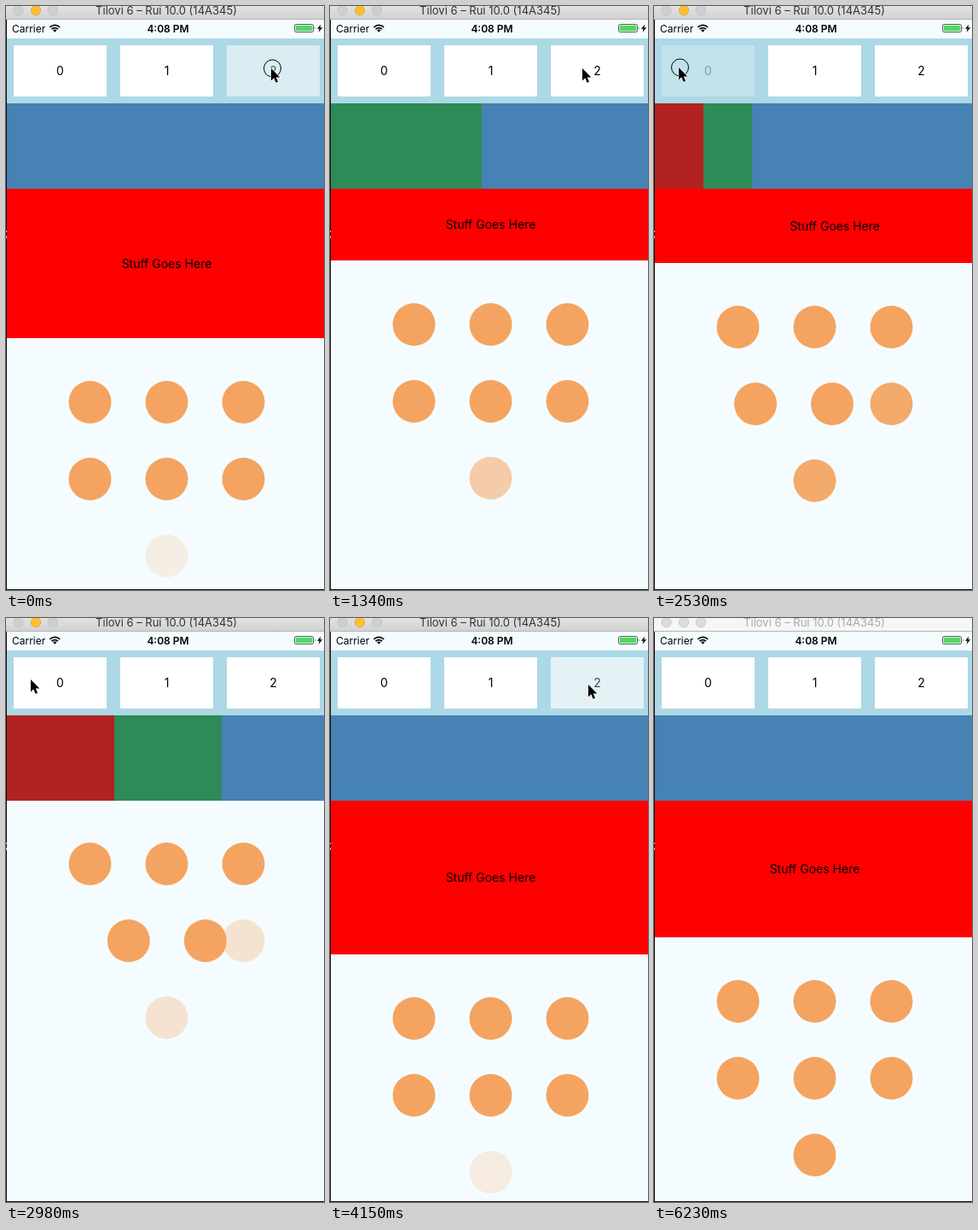
Recreate the animation shown at these times as an HTML page. Size 373x684 px, loop 6330 ms.

```html
<!DOCTYPE html>
<html lang="en">
<head>
<meta charset="utf-8">
<title>Layout spring</title>
<style>
html, body { margin: 0; width: 100%; height: 100%; overflow: hidden; background: #f5fcff; }
svg { display: block; }
text { font-family: Inter, Roboto, sans-serif; fill: #000; }
.mid { text-anchor: middle; }
</style>
</head>
<body>
<svg id="stage" width="373" height="684" viewBox="0 0 373 684">
  <defs>
    <linearGradient id="chrome" x2="0" y2="1">
      <stop offset="0" stop-color="#e2e2e2"/><stop offset="1" stop-color="#d2d2d2"/>
    </linearGradient>
  </defs>
  <rect width="373" height="684" fill="#f5fcff"/>

  <g id="titleBar">
    <rect id="bar" width="373" height="15" fill="url(#chrome)"/>
    <rect y="15" width="373" height="1" fill="#b4b4b4"/>
    <g id="lights" stroke-width=".7">
      <circle cx="14.5" cy="5" r="5.7"/><circle cx="35" cy="5" r="5.7"/><circle cx="55" cy="5" r="5.7"/>
    </g>
    <text id="title" class="mid" x="188" y="10" font-size="13">Tilovi 6 – Rui 10.0 (14A345)</text>
  </g>

  <text x="7" y="31" font-size="12">Carrier</text>
  <g fill="none" stroke="#000" stroke-width="1.7">
    <path d="M51.4 24.8Q57.3 19.8 63.2 24.8M53.5 27.2Q57.3 24 61.1 27.2"/>
    <path d="M55 28.3Q57.3 26.6 59.6 28.3L57.3 30.8Z" fill="#000" stroke="none"/>
  </g>
  <text class="mid" x="190" y="31" font-size="12" font-weight="600">4:08 PM</text>
  <rect x="338.5" y="21.5" width="22" height="9" rx="1.8" fill="#fff" stroke="#333" stroke-width=".8"/>
  <rect x="339.7" y="22.7" width="19.6" height="6.6" rx=".8" fill="#4cd964"/>
  <path d="M361.8 24.2q1.6 1.8 0 3.6z" fill="#333"/>
  <path d="M369.3 21.5L365 26.8H367.6L366.6 30.8L371.2 25.2H368.4Z"/>

  <rect y="38" width="373" height="76" fill="#add8e6"/>
  <g id="buttons"></g>
  <g id="stripes"></g>
  <svg id="box" y="214" width="373">
    <rect width="373" height="300" fill="#f00"/>
    <text id="label" class="mid" font-size="14">Stuff Goes Here</text>
  </svg>
  <g id="dots" fill="#f4a460"></g>

  <path d="M.5 16V684M0 683.5H373" stroke="#111"/>
  <path d="M.5 263V265M.5 269V272" stroke="#aaa"/>
  <circle id="ring" r="10" fill="none" stroke="#000"/>
  <path id="cursor" d="M0 0V14.4L3.3 11.3L5.6 16.7L8 15.7L5.7 10.4H10.3Z"
        stroke="#fff" stroke-width="1.1" paint-order="stroke"/>
</svg>
<script>
const LOOP = 6330, SPRING = 700, PERIOD = 295, DAMPING = 0.4;
const LEFT = 1, TOP = 214;

// Each tap: pressed at `down`, released at `up`, then that page springs in.
const taps = [
  { page: 2, down: -300, up: -118 },
  { page: 1, down: 740, up: 1020 },
  { page: 2, down: 1430, up: 1561 },
  { page: 0, down: 2330, up: 2480 },
  { page: 1, down: 3270, up: 3425 },
  { page: 2, down: 3830, up: 4013 }
];
const pages = [
  { edges: [0, 125, 250], height: 0, count: 5, shift: 45, textX: 52 },
  { edges: [0, 0, 187.5], height: 80, count: 6, shift: 0, textX: 0 },
  { edges: [0, 0, 0], height: 160, count: 7, shift: 0, textX: 0 }
];
// Pointer: time, x, y
const route = [
  [0, 311, 73], [200, 310, 74], [650, 168, 82], [1060, 168, 82],
  [1390, 302, 73], [1640, 302, 73], [1930, 287, 72], [2300, 29, 72],
  [2980, 29, 72], [3250, 166, 79], [3440, 168, 79], [3720, 302, 78],
  [4200, 303, 78], [4450, 307, 130], [4740, 313, 530], [4890, 316, 668]
];

// The screen refreshes in steps of about 150 ms.
const ticks = [];
const tens = v => Math.floor(v / 10) * 10;
for (let k = 0; k <= 25; k++) ticks.push(tens(k * 148.8 + 5));
for (let k = 1; k <= 7; k++) ticks.push(tens(3720 + k * 146));
ticks.push(4890, 5040, 6230);

const $ = id => document.getElementById(id);
const lerp = (a, b, p) => a + (b - a) * p;
const clamp = v => Math.max(0, Math.min(1, v));
const ease = v => v < 0.5 ? 2 * v * v : 1 - 2 * (1 - v) * (1 - v);
const set = (el, attrs) => {
  for (const key in attrs) el.setAttribute(key, attrs[key]);
  return el;
};
const add = (parent, tag, attrs) =>
  parent.appendChild(set(document.createElementNS('http://www.w3.org/2000/svg', tag), attrs));

const buttons = [0, 1, 2].map(i => {
  const g = add($('buttons'), 'g', {});
  add(g, 'rect', { x: 9 + i * 125, y: 46, width: 109, height: 60, fill: '#fff' });
  add(g, 'text', { x: 63.5 + i * 125, y: 81, 'font-size': 14, class: 'mid' }).textContent = i;
  return g;
});
const stripes = ['#b22222', '#2e8b57', '#4682b4'].map(fill =>
  add($('stripes'), 'rect', { y: 114, width: 800, height: 100, fill }));
const dots = Array.from({ length: 7 }, () => add($('dots'), 'circle', { r: 25 }));
const lights = [...$('lights').children];

function spring(t) {
  if (t >= SPRING) return 1;
  const angle = 2 * Math.PI * t / PERIOD;
  const ratio = DAMPING / Math.sqrt(1 - DAMPING * DAMPING);
  return 1 - Math.exp(-ratio * angle) * (Math.cos(angle) + ratio * Math.sin(angle));
}

function pointerAt(t) {
  const i = route.findIndex(stop => stop[0] > t);
  if (i < 0) return route[route.length - 1].slice(1);
  const a = route[i - 1], b = route[i];
  const p = ease((t - a[0]) / (b[0] - a[0]));
  return [lerp(a[1], b[1], p), lerp(a[2], b[2], p)];
}

function drawLayout(t) {
  const last = taps.filter(tap => tap.up <= t).length - 1;
  const from = pages[last ? taps[last - 1].page : 1];
  const to = pages[taps[last].page];
  const age = t - taps[last].up;
  const p = spring(age), fade = clamp(age / SPRING);
  const mix = key => lerp(from[key], to[key], p);

  stripes.forEach((el, i) =>
    set(el, { x: LEFT + Math.round(lerp(from.edges[i], to.edges[i], p)) }));

  const height = Math.round(mix('height'));
  set($('box'), { height: Math.max(0, height), visibility: height > 0 ? 'visible' : 'hidden' });
  set($('label'), { x: 188.5 + mix('textX'), y: height / 2 + 5 });

  dots.forEach((el, i) => {
    const row = Math.floor(i / 3), col = row === 2 ? 1 : i % 3;
    const moves = i === 3 || i === 4;
    set(el, {
      cx: 98.5 + col * 90 + (moves ? mix('shift') : 0),
      cy: TOP + height + 75 + row * 90,
      opacity: lerp(+(i < from.count), +(i < to.count), fade)
    });
  });
}

function drawTouch(t) {
  buttons.forEach((el, i) => {
    const tap = taps.filter(item => item.page === i && item.down <= t).pop();
    let opacity = 1;
    if (tap) {
      opacity = t < tap.up
        ? lerp(1, 0.2, ease(clamp((t - tap.down) / 150)))
        : lerp(0.2, 1, ease(clamp((t - tap.up) / 250)));
    }
    set(el, { opacity });
  });

  const [x, y] = pointerAt(t).map(Math.round);
  const touching = taps.some(tap => tap.down <= t && t <= tap.up + 130);
  set($('cursor'), { transform: `translate(${x} ${y})`, visibility: t < 5040 ? 'visible' : 'hidden' });
  set($('ring'), { cx: x + 1.5, cy: y, visibility: touching ? 'visible' : 'hidden' });
}

function drawTitle(active) {
  set($('bar'), { fill: active ? 'url(#chrome)' : '#f6f6f6' });
  $('title').style.fill = active ? '#333' : '#aaa';
  lights.forEach((el, i) => {
    const lit = active && i === 1;
    set(el, { fill: lit ? '#fdbe34' : active ? '#cfcfcf' : '#dcdcdc', stroke: lit ? '#dfa023' : '#bdbdbd' });
  });
}

const start = performance.now();
function frame() {
  const now = (performance.now() - start) % LOOP;
  const t = ticks.filter(tick => tick <= now).pop() || 0;
  drawLayout(t);
  drawTouch(t);
  drawTitle(t < 6230);
  requestAnimationFrame(frame);
}
frame();
</script>
</body>
</html>
```
